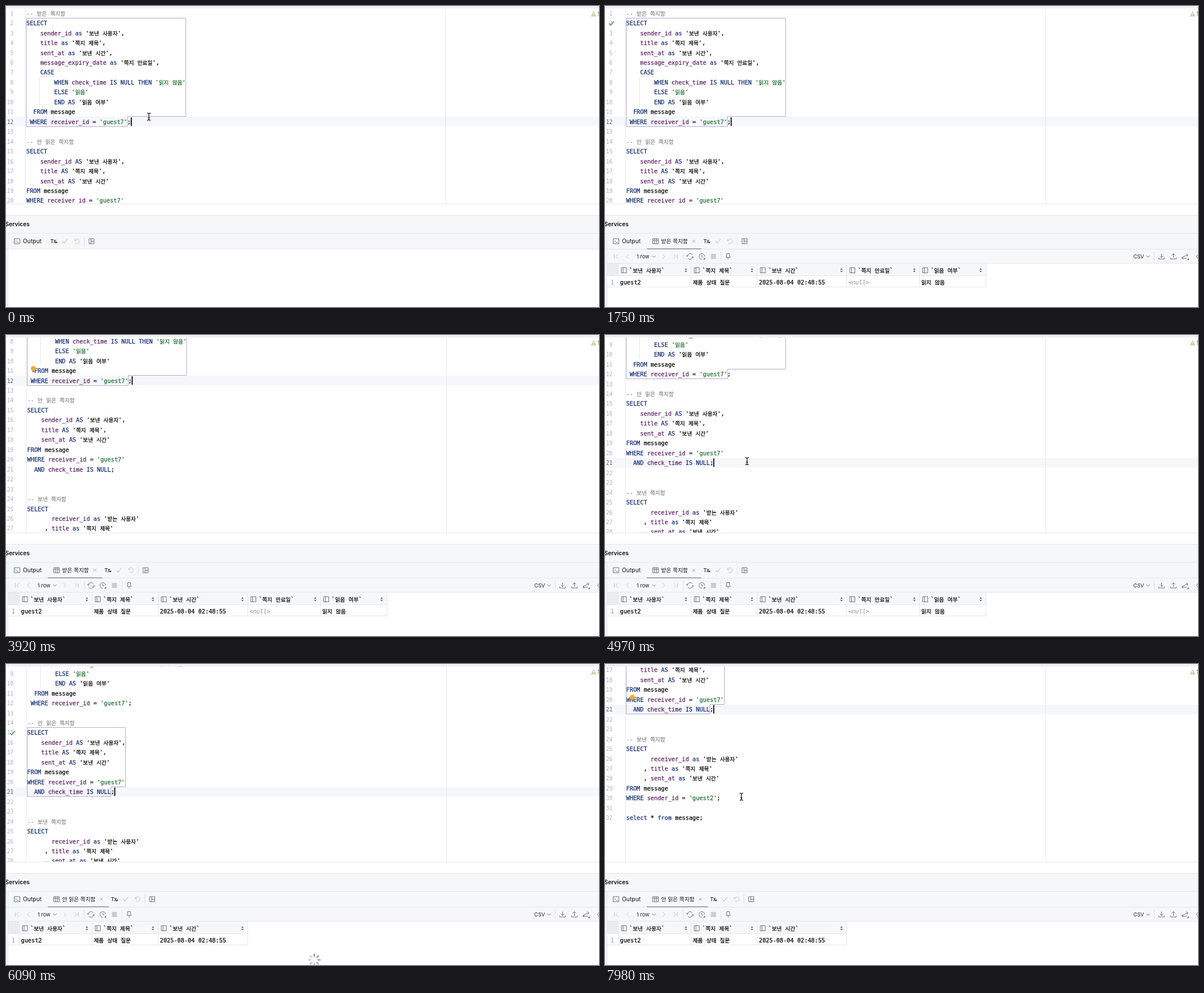
These frames come from a looping animation (1050 px wide and 533 px high, 8 s). An HTML page with a canvas:

```html
<!DOCTYPE html>
<html lang="ko">
<head>
<meta charset="utf-8">
<title>SQL console</title>
<style>
html, body { margin: 0; width: 100%; height: 100%; overflow: hidden; background: #fff; }
canvas { display: block; }
</style>
</head>
<body>
<canvas id="stage" width="1050" height="533"></canvas>
<script>
const c = document.getElementById('stage').getContext('2d');
const LOOP = 8000, STEP = 70;
const MONO = '10.25px "DejaVu Sans Mono", monospace';
const NUMBER = '9.6px "DejaVu Sans Mono", monospace';
const UI = '10.3px Inter, sans-serif';
const SMALL = '9.2px Inter, sans-serif';
const BOLD = '600 10.3px Inter, sans-serif';
const HANGUL = '9.65px "Noto Sans CJK KR", "Noto Sans CJK", sans-serif';
const LINE = '#e4e6eb', PANEL = '#f6f7f9', ICON = '#6c707e', PALE = '#c3c6cf';

const code = `-- 받은 쪽지함
SELECT
    sender_id as '보낸 사용자',
    title as '쪽지 제목',
    sent_at as '보낸 시간',
    message_expiry_date as '쪽지 만료일',
    CASE
        WHEN check_time IS NULL THEN '읽지 않음'
        ELSE '읽음'
        END AS '읽음 여부'
  FROM message
 WHERE receiver_id = 'guest7';

-- 안 읽은 쪽지함
SELECT
    sender_id AS '보낸 사용자',
    title AS '쪽지 제목',
    sent_at AS '보낸 시간'
FROM message
WHERE receiver_id = 'guest7'
  AND check_time IS NULL;


-- 보낸 쪽지함
SELECT
       receiver_id as '받는 사용자'
     , title as '쪽지 제목'
     , sent_at as '보낸 시간'
FROM message
WHERE sender_id = 'guest2';

select * from message;`.split('\n');

const KEYWORD = /^(select|as|case|when|is|null|then|else|end|from|where|and)$/i;
const queries = [
  { from: 2, to: 12, tab: '받은 쪽지함', cols: 5,
    rows: ["SELECT sender_id as '보낸 사용자', title as '쪽지 제목', se...",
           "-- 받은 쪽지함 SELECT sender_id as '보낸 사용자', title as '..."] },
  { from: 15, to: 21, tab: '안 읽은 쪽지함', cols: 3,
    rows: ["SELECT sender_id AS '보낸 사용자', title AS '쪽지 제목', s...",
           "-- 안 읽은 쪽지함 SELECT sender_id AS '보낸 사용자', title..."] }
];
const colX = [23.5, 152.5, 269.5, 428, 557, 674.5];
const heads = ['보낸 사용자', '쪽지 제목', '보낸 시간', '쪽지 만료일', '읽음 여부'];
const cells = ['guest2', '제품 상태 질문', '2025-08-04 02:48:55', '<null>', '읽지 않음'];

const within = (t, ...spans) => spans.some(([a, b]) => t >= a && t < b);
const clamp = v => Math.max(0, Math.min(1, v));

function rect(x, y, w, h, color) {
  c.fillStyle = color;
  c.fillRect(x, y, w, h);
}

// Draws mixed Latin and Hangul text around centre line y; returns its right end.
function put(text, x, y, color, font = UI) {
  for (const run of text.split(/([가-힣]+)/)) {
    c.font = /[가-힣]/.test(run) ? HANGUL : font;
    if (color) {
      c.fillStyle = c.strokeStyle = color;
      c.fillText(run, x, y + 3.7);
      if (font === MONO) {
        // Thin outline for a medium weight
        c.lineWidth = .25;
        c.strokeText(run, x, y + 3.7);
      }
    }
    x += c.measureText(run).width;
  }
  return x;
}
const width = (text, font = MONO) => put(text, 0, 0, null, font);

function icon(path, x, y, color = ICON, weight = 1) {
  c.save();
  c.translate(x, y);
  c.strokeStyle = color;
  c.lineWidth = weight;
  c.stroke(new Path2D(path));
  c.restore();
}

function codeLine(text, x, y) {
  let last = '';
  for (const [token] of text.matchAll(/--.*|'[^']*'|\w+|\s+|./g)) {
    let color = '#080808';
    if (token.startsWith('--')) color = '#8c8c8c';
    else if (token[0] === "'") color = /^as$/i.test(last) ? '#080808' : '#237034';
    else if (KEYWORD.test(token)) color = '#142e72';
    else if (/^\w+$/.test(token) && token !== 'message') color = '#5c2164';
    x = put(token, x, y, color, MONO);
    if (token.trim()) last = token;
  }
}

function editor(s) {
  const left = 36 + s.dx;
  const mid = n => 13 + 17.46 * (n - 1) - s.scroll;
  const edge = n => Math.floor(mid(n) - 9.2) + .5;
  const { from, to } = s.query;
  const endX = left + width(code[to - 1].slice(0, -1));
  const caretX = left + width(code[s.line - 1]);

  c.save();
  c.beginPath();
  c.rect(0, 4, 1050, 346.5);
  c.clip();
  rect(0, edge(s.line) + .5, 1050, 17, '#f5f7fa');
  rect(34 + s.dx, 0, 1, 351, LINE);
  rect(778 + s.dx, 0, 1, 351, LINE);
  if (s.popup) {
    rect(left, edge(from), 1050, edge(to) - edge(from), '#ccccff');
    rect(left, edge(to), endX - left, edge(to + 1) - edge(to), '#ccccff');
  }
  rect(left + 23, edge(8), 1, edge(11) - edge(8), '#e3e4e8');
  rect(left + 24.7, mid(7) + 6, 24.7, 1, '#dcdcc4');

  code.forEach((text, i) => {
    const y = mid(i + 1), n = String(i + 1);
    if (y < -10 || y > 365) return;
    put(n, 13.3 - width(n, NUMBER), y, i + 1 === s.line ? '#5a6078' : '#adb1bf', NUMBER);
    codeLine(text, left, y);
  });

  // Outline of the statement under the caret
  const right = left + Math.max(...code.slice(from - 1, to - 1).map(l => width(l)));
  c.beginPath();
  [[left + .2, edge(from)], [right, edge(from)], [right, edge(to)], [endX, edge(to)],
   [endX, edge(to + 1)], [left + .2, edge(to + 1)]].forEach(p => c.lineTo(...p));
  c.closePath();
  c.strokeStyle = '#b3a9d2';
  c.lineWidth = 1;
  c.stroke();

  if (s.result) icon('M-4.5 .5L-1.5 3.5L4.5 -3.5', 11.5, mid(s.result.from), '#4f9b62', 1.7);
  if (s.bulb) {
    const y = mid(s.bulb) - 4;
    c.fillStyle = '#f7a82a';
    c.beginPath();
    c.arc(48.5, y, 4.5, 0, 7);
    c.fill();
    rect(46.6, y + 4, 3.8, 2.4, '#8a8068');
  }
  if (s.caret) rect(caretX - .2, mid(s.line) - 7.8, 1.8, 15, '#000');

  if (s.popup) {
    c.fillStyle = '#fff';
    c.beginPath();
    c.roundRect(1030, 3, 26, 20, 4);
    c.fill();
  }
  c.fillStyle = '#cfcda6';
  c.beginPath();
  c.moveTo(1040.5, 9);
  c.lineTo(1045.5, 18.5);
  c.lineTo(1035.5, 18.5);
  c.fill();
  rect(1040, 12, 1, 3, '#fff');
  rect(1040, 16, 1, 1, '#fff');
  put('1', 1047, 14, '#777');
  c.restore();
  return { x: caretX - 1.5, y: edge(s.line + 1) };
}

function popup(s, { x, y }) {
  c.save();
  c.globalAlpha = s.popup;
  c.translate(x, y);
  c.beginPath();
  c.roundRect(0, 0, 275, 91, 7);
  c.fillStyle = '#fff';
  c.shadowColor = 'rgba(0,0,0,.32)';
  c.shadowBlur = 11;
  c.shadowOffsetY = 3;
  c.fill();
  c.shadowColor = 'transparent';
  c.save();
  c.clip();
  rect(0, 31.5, 275, 18.5, '#d4e2ff');
  rect(0, 76, 275, 15, PANEL);
  put('Statements', 139 - width('Statements', BOLD) / 2, 16.5, '#111', BOLD);
  s.query.rows.forEach((row, i) => put(row, 1.5, 41 + 19 * i, '#111'));
  put('Customize', 3, 83, '#315ba6');
  c.restore();
  c.beginPath();
  c.roundRect(0, 0, 275, 91, 7);
  c.strokeStyle = '#b4b6bc';
  c.lineWidth = 1;
  c.stroke();
  c.restore();
}

function services(s) {
  rect(0, 0, 1050, 3, '#f3f4f6');
  rect(0, 3, 1050, 1, LINE);
  rect(0, 350, 1050, 1, LINE);
  rect(0, 370, 1050, 61, PANEL);
  rect(0, 403, 3.5, 130, PANEL);
  for (const y of [370, 402, 430]) rect(0, y, 1050, 1, LINE);
  rect(3, 403, 1, 130, LINE);
  put('Services', -1.5, 386.5, '#111', BOLD);
  icon('M-5 -4.5H5V4.5H-5ZM-3 -2L-1 0L-3 2M0 2.2H3', 19.5, 416.5);
  put('Output', 30, 416.5, '#111');

  let x = 0;
  if (s.result) {
    const end = put(s.result.tab, 99.5, 416.5, '#111');
    icon('M-5 -4.5H5V4.5H-5ZM-5 -1.5H5M-1.7 -4.5V4.5M1.7 -4.5V4.5', 89.5, 416.5);
    icon('M-2.5 -2.5L2.5 2.5M2.5 -2.5L-2.5 2.5', end + 10.5, 416.5, '#a0a3ad');
    rect(74, 429, end - 50, 2, '#a2a7b3');
    x = end - 51;
  }
  put('Tx', x + 78.5, 416.5, '#222', '500 9.2px Inter, sans-serif');
  icon('M0 2L2.5 2L2.5 -.5Z', x + 87.5, 417.5, '#333');
  icon('M-4.5 0L-1.5 3.5L4.5 -4', x + 104.5, 416.5, PALE, 1.2);
  icon('M-4 -4V-1H-1M-4 -1A4.3 4.3 0 1 1 -3 3.2', x + 125.5, 416.5, PALE);
  rect(x + 138, 408, 1, 17, '#dddfe5');
  icon('M-4.5 -4.5H4.5V4.5H-4.5ZM-1 -4.5V4.5M-1 0H4.5', x + 151.5, 416.5);
  if (s.result) grid(s.result);
}

function grid({ cols }) {
  const y = 443.5;
  rect(4, 431, 1046, 24, PANEL);
  rect(4, 455, 1046, 1, LINE);
  icon('M-3.5 -4V4M3 -4L-1 0L3 4', 20, y, PALE);
  icon('M2 -4L-2 0L2 4', 40, y, PALE);
  put('1 row', 56, y - .3, '#222', SMALL);
  const chevron = 'M-3 -1.5L0 1.5L3 -1.5';
  icon(chevron, 86.5, y);
  icon('M-2 -4L2 0L-2 4', 104, y, PALE);
  icon('M3.5 -4V4M-3 -4L1 0L-3 4', 124.5, y, PALE);
  icon('M-5 0A5 5 0 0 1 4 -3M5 0A5 5 0 0 1 -4 3M-7 -2L-5 0L-3 -2M3 2L5 0L7 2', 150.5, y);
  icon('M5 0A5 5 0 1 0 0 5M0 -3V0L2.5 1.5M3 5H5.5V2.5Z', 171.5, y);
  rect(187.5, 439, 9, 9, '#c9ccd3');
  icon('M-2.5 -5H2.5V-1L4 1.5H-4L-2.5 -1ZM0 1.5V5.5', 218, y);
  for (const x of [138, 205, 972]) rect(x, 435, 1, 17, '#dddfe5');
  put('CSV', 935.5, y - .3, '#222', SMALL);
  icon(chevron, 961.5, y);
  icon('M0 -5V2M-3 -1L0 2L3 -1M-5 2V4.5H5V2', 985.5, y);
  icon('M0 2.5V-5M-3 -2L0 -5L3 -2M-5 2V4.5H5V2', 1006.5, y);
  icon('M-6 2L5 -3M2 -5L5 -3L3.5 0M3 3H-5M-3 .5L-5.5 3L-3 5.5M4 6H6.5V3.5Z', 1027, y);
  icon('M-3 0Q0 -5 5 -5M-3 0Q0 5 5 5', 1050, y);

  const end = colX[cols];
  rect(4, 456, end - 4, 22, PANEL);
  rect(4, 456, 19, 22, '#ebecf0');
  for (const ly of [477, 497]) rect(4, ly, end - 4, 1, LINE);
  for (let i = 0; i <= cols; i++) rect(colX[i] - .5, 456, 1, 42, LINE);
  put('1', 10, 489, '#a4a8b5', MONO);
  for (let i = 0; i < cols; i++) {
    const x = colX[i], isNull = cells[i] === '<null>';
    icon('M-4.5 -4.5H4.5V4.5H-4.5ZM-1.5 -4.5V4.5', x + 10, 468);
    put('`' + heads[i] + '`', x + 19.5, 468, '#111', MONO);
    icon('M-1.5 -1L0 -2.7L1.5 -1M-1.5 1L0 2.7L1.5 1', colX[i + 1] - 9.3, 468, '#555', 1.2);
    put(cells[i], x + 3, 489, isNull ? '#8c8c8c' : '#080808', (isNull ? 'italic ' : '') + MONO);
  }
}

function spinner(turn) {
  for (let i = 0; i < 8; i++) {
    const a = i * Math.PI / 4, shade = 150 + (i + turn) % 8 * 8;
    c.strokeStyle = `rgb(${shade},${shade},${shade})`;
    c.lineWidth = 2.6;
    c.beginPath();
    c.moveTo(546 + 5.5 * Math.cos(a), 524 + 5.5 * Math.sin(a));
    c.lineTo(546 + 11 * Math.cos(a), 524 + 11 * Math.sin(a));
    c.stroke();
  }
}

function pointer(t) {
  const move = [
    [0, 1120, 0, 210, 253, 196, 260.5, 197],
    [4480, 5530, 4480, 4970, 262, 203, 251.5, 223.5],
    [7910, LOOP, 7910, 7980, 247, 227, 241.5, 235]
  ].find(m => within(t, m));
  if (!move) return;
  const [, , t0, t1, x0, y0, x1, y1] = move, p = clamp((t - t0) / (t1 - t0));
  const x = x0 + (x1 - x0) * p, y = y0 + (y1 - y0) * p;
  const beam = 'M-3 -6.3Q0 -6.3 0 -4.5V4.5Q0 6.3 -3 6.3M3 -6.3Q0 -6.3 0 -4.5V4.5Q0 6.3 3 6.3M-1.5 1.8H1.5';
  icon(beam, x, y, '#fff', 2.6);
  icon(beam, x, y, '#000', 1.2);
}

function draw(now) {
  const t = Math.floor(now % LOOP / STEP) * STEP;
  const ease = (start, span) => 1 - (1 - clamp((t - start) / span)) ** 1.9;
  const open = within(t, [1120, 1540]) ? 1120 : within(t, [5530, 6020]) ? 5530 : null;
  const result = t < 1750 ? null : queries[t < 6020 ? 0 : 1];
  const s = {
    result,
    dx: result ? 1.6 : 0,
    scroll: 135.7 * ease(3360, 770) + 146 * ease(7070, 560),
    line: t < 4760 ? 12 : 21,
    query: queries[t < 5320 ? 0 : 1],
    caret: within(t, [0, 980], [1750, 2240], [2800, 3290], [3780, 4340], [4760, 5320], [6020, LOOP]),
    bulb: within(t, [2520, 4760]) ? 11 : t >= 6930 ? 20 : 0,
    popup: open === null ? 0 : clamp((t - open + STEP) / 210)
  };
  rect(0, 0, 1050, 533, '#fff');
  const anchor = editor(s);
  services(s);
  if (within(t, [1820, 2240], [6090, 6580]))
    spinner([2030, 2170, 6230, 6370].filter(k => t >= k).length);
  if (s.popup) popup(s, anchor);
  pointer(t);
}

const start = performance.now();
(function tick() {
  draw(performance.now() - start);
  requestAnimationFrame(tick);
})();
</script>
</body>
</html>
```
